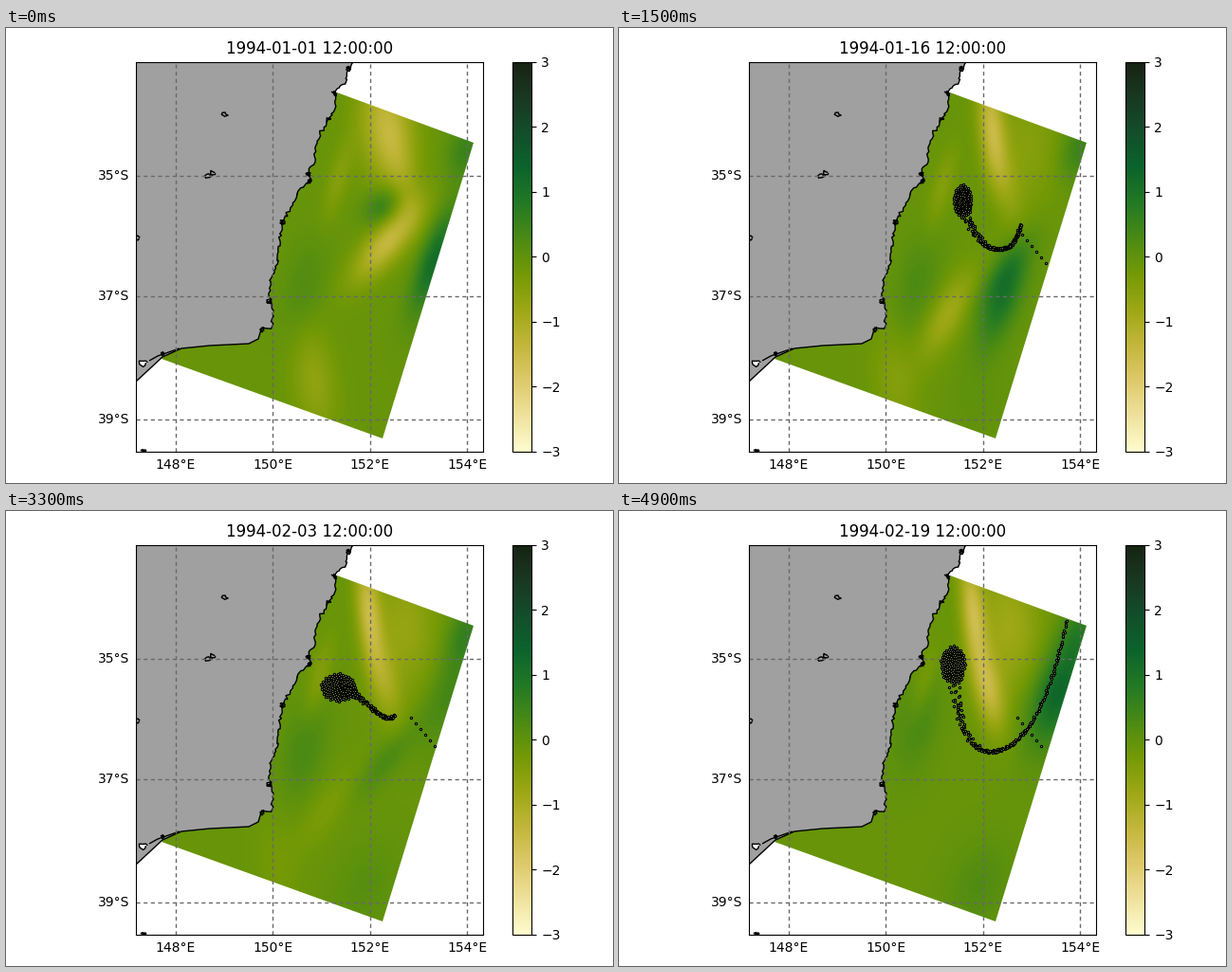
A matplotlib script for the animation above (5 s loop, 640 px wide and 480 px high).

```python
import numpy as np
import matplotlib.pyplot as plt
from matplotlib.animation import FuncAnimation
from matplotlib.colors import LinearSegmentedColormap
from matplotlib.patches import Polygon

W, H, DPI = 640, 480, 100
FRAMES, INTERVAL = 50, 100
LEFT, RIGHT, TOP, BOTTOM = 137.2, 503.2, 35.6, 446.6
BODY, TAIL = 150, 210

SPEED = LinearSegmentedColormap.from_list("speed", [
    "#fefccd", "#efe19c", "#ddc96a", "#c2b63b", "#9da715", "#749905",
    "#4b8a14", "#237924", "#0b642c", "#124e2b", "#193822", "#172312"])

rng = np.random.default_rng(4)
grid_x, grid_y = np.meshgrid(np.arange(161, 498, 2.0), np.arange(65, 438, 2.0))


def blob(x, y, long, short, degrees, height):
    """A tilted Gaussian bump."""
    c, s = np.cos(np.radians(degrees)), np.sin(np.radians(degrees))
    dx, dy = grid_x - x, grid_y - y
    u, v = (dx * c + dy * s) / long, (dy * c - dx * s) / short
    return height * np.exp(-(u * u + v * v) / 2)


def field(frame):
    t = frame / (FRAMES - 1)
    settle = np.exp(-frame / 6)
    ridge = 402 - 29 * t
    slide = 1 - np.exp(-frame / 8)
    mid = np.sin(np.pi * t)
    # The strong current swings south, then back along the open edge.
    turns = (0, 11, 19, 28, 49)
    jet_x = np.interp(frame, turns, (452, 408, 403, 468, 463))
    jet_y = np.interp(frame, turns, (245, 325, 238, 190, 192))
    jet = np.interp(frame, (0, 11, 40, 49), (1.25, 1.2, .25, 1.4))
    return (-0.1
            + blob(ridge, 105, 42, 9 + 11 * settle, 84, -1.25)
            + blob(ridge + 17, 160 + 30 * t, 32, 11, 78, (slide - 1) * .1 - .3 - .8 * t * t)
            + blob(ridge + 38, 122, 50, 24, 88, -.35 * slide - .4 * t)
            + blob(402 - 65 * slide, 226 + 90 * slide, 36, 13, 130 - 20 * mid * (1 - t), -1.3 * (1 - t) ** 1.4)
            + blob(jet_x, jet_y, 40, 11 + 7 * t, 110, jet)
            + blob(485, 128, 24, 13, 107, .6)
            + blob(397, 188, 16, 12, 130, .75 * settle)
            + blob(314, 275 - 55 * t * t, 38, 16, 102, .3 + .15 * t)
            + blob(325 - 40 * slide, 372, 40, 16, 83, -.55 * (1 - t))
            + blob(350 - 30 * t, 160 + 25 * t, 30, 8, 105, -.4)
            + blob(402, 262, 36, 10, 130, .45 * mid * slide)
            + blob(380, 395, 34, 22, 110, .3 * t))


# Swarm pose: body centre and radii, then tail start, two handles, end, bunching
POSE_TIMES = (11, 19, 27, 33, 40, 49)
POSES = np.array([
    (362, 190, 10, 16, 366, 195, 382, 248, 418, 247, 462, 211, 1),
    (362, 174, 9, 18, 360, 185, 375, 235, 415, 247, 384, 203, 1),
    (350, 186, 16, 11, 355, 190, 372, 215, 395, 222, 458, 190, 1.2),
    (350, 186, 18, 15, 358, 186, 380, 200, 400, 228, 409, 215, 2.5),
    (351, 188, 13, 18, 360, 182, 385, 188, 410, 191, 446, 192, 2.2),
    (352, 162, 13, 20, 354, 175, 352, 285, 440, 292, 471, 115, 1)])

turn = np.arange(BODY) * 2.39996
disc = np.sqrt((np.arange(BODY) + .5) / BODY) * [np.cos(turn), np.sin(turn)]
share = (np.arange(TAIL) + 1) / TAIL
fray = rng.uniform(-1, 1, (2, TAIL))
stray = np.arange(6)


def swarm(frame):
    pose = [np.interp(frame, POSE_TIMES, column) for column in POSES.T]
    centre, radii, bunch = np.array(pose[:2]), np.array(pose[2:4]), pose[-1]
    body = centre[:, None] + radii[:, None] * disc
    # The tail is a Bezier curve that pays out until the first pose.
    u = share ** bunch * min(1, frame / POSE_TIMES[0])
    weights = np.array([(1 - u) ** 3, 3 * u * (1 - u) ** 2, 3 * u * u * (1 - u), u ** 3])
    tail = np.reshape(pose[4:12], (4, 2)).T @ weights + fray * (1.2 + 6 * (1 - u) ** 4)
    loose = np.array([424 + 5 * stray + 10 * np.sin(frame / 5), 218 + 6 * stray])
    return np.hstack([body, tail, loose]).T


def roughen(points, size, step=2.5):
    """Subdivide a line and shake it a little."""
    points = np.array(points, float)
    dist = np.r_[0, np.cumsum(np.hypot(*np.diff(points, axis=0).T))]
    t = np.arange(0, dist[-1], step)
    line = np.column_stack([np.interp(t, dist, p) for p in points.T])
    return np.vstack([line + rng.normal(0, size, line.shape), points[-1:]])


def place(x0, y0, x1, y1):
    """Axes from a pixel box measured from the top left."""
    return fig.add_axes([x0 / W, 1 - y1 / H, (x1 - x0) / W, (y1 - y0) / H])


fig = plt.figure(figsize=(W / DPI, H / DPI), dpi=DPI, facecolor="white")
ax = place(LEFT, TOP, RIGHT, BOTTOM)

domain = Polygon([(349, 68), (493, 121), (397, 433), (164, 349)], fc="none", ec="none")
ax.add_patch(domain)
sea = ax.imshow(field(0), cmap=SPEED, vmin=-3, vmax=3, extent=(160, 498, 438, 64),
                interpolation="bilinear", aspect="auto", zorder=1)
sea.set_clip_path(domain)

east_coast = roughen([
    (367, 35), (361, 45), (358, 56), (347, 68), (348, 83), (340, 96), (332, 110),
    (326, 128), (325, 143), (318, 150), (322, 161), (309, 171), (301, 189), (292, 203),
    (289, 224), (285, 252), (277, 273), (282, 298), (280, 316), (269, 318)], 0.8)
south_coast = [(266, 328), (256, 333), (215, 335), (185, 338), (165, 347), (137, 373)]
coast = np.vstack([east_coast, south_coast])
ax.add_patch(Polygon(np.vstack([[(130, 373), (130, 30)], coast]),
                     fc="#a0a0a0", ec="none", zorder=1.2))


def shore(points, fill="none"):
    ax.add_patch(Polygon(points, closed=False, fc=fill, ec="k", lw=1, zorder=1.3))


shore(coast)
for inlet in [(361, 43), (346, 69), (340, 97), (319, 154), (319, 161), (291, 205),
              (277, 288), (269, 318), (166, 343)]:
    shore(inlet + rng.uniform(-3, 3, (9, 2)))
shore([(151, 351), (160, 346), (183, 338)])
for x, y, size, fill in [(231, 91, 3, "none"), (213, 156, 3, "none"), (218, 153, 3, "none"),
                         (139, 222, 2, "none"), (145, 446, 2, "none"), (144, 354, 4, "white")]:
    a = np.linspace(0, 2 * np.pi, 9)
    ring = np.column_stack([x + size * np.cos(a), y + size * .7 * np.sin(a)])
    shore(ring + rng.normal(0, .7, ring.shape), fill)

ax.set_xticks([179, 281.4, 384, 486.4], [f"{d}°E" for d in range(148, 155, 2)])
ax.set_yticks([156.3, 283, 413.4], [f"{d}°S" for d in (35, 37, 39)], va="center")
ax.tick_params(length=0, pad=5)
ax.set_axisbelow("line")
ax.grid(color="#696969", lw=1, ls=(0, (3, 2.5)))
ax.set_xlim(LEFT, RIGHT)
ax.set_ylim(BOTTOM, TOP)

fig.colorbar(sea, cax=place(534.2, TOP, 554.4, BOTTOM), ticks=range(-3, 4))

title = ax.set_title("", fontsize=12)
dots = ax.scatter([], [], s=2.8, c="#7d8a55", edgecolors="k", linewidths=0.75, zorder=2)


def update(frame):
    title.set_text(f"{np.datetime64('1994-01-01') + frame} 12:00:00")
    sea.set_data(field(frame))
    dots.set_offsets(swarm(frame) if frame else np.empty((0, 2)))
    return title, sea, dots


anim = FuncAnimation(fig, update, frames=FRAMES, interval=INTERVAL, repeat=True,
                     repeat_delay=0, blit=False)
plt.show()
```
